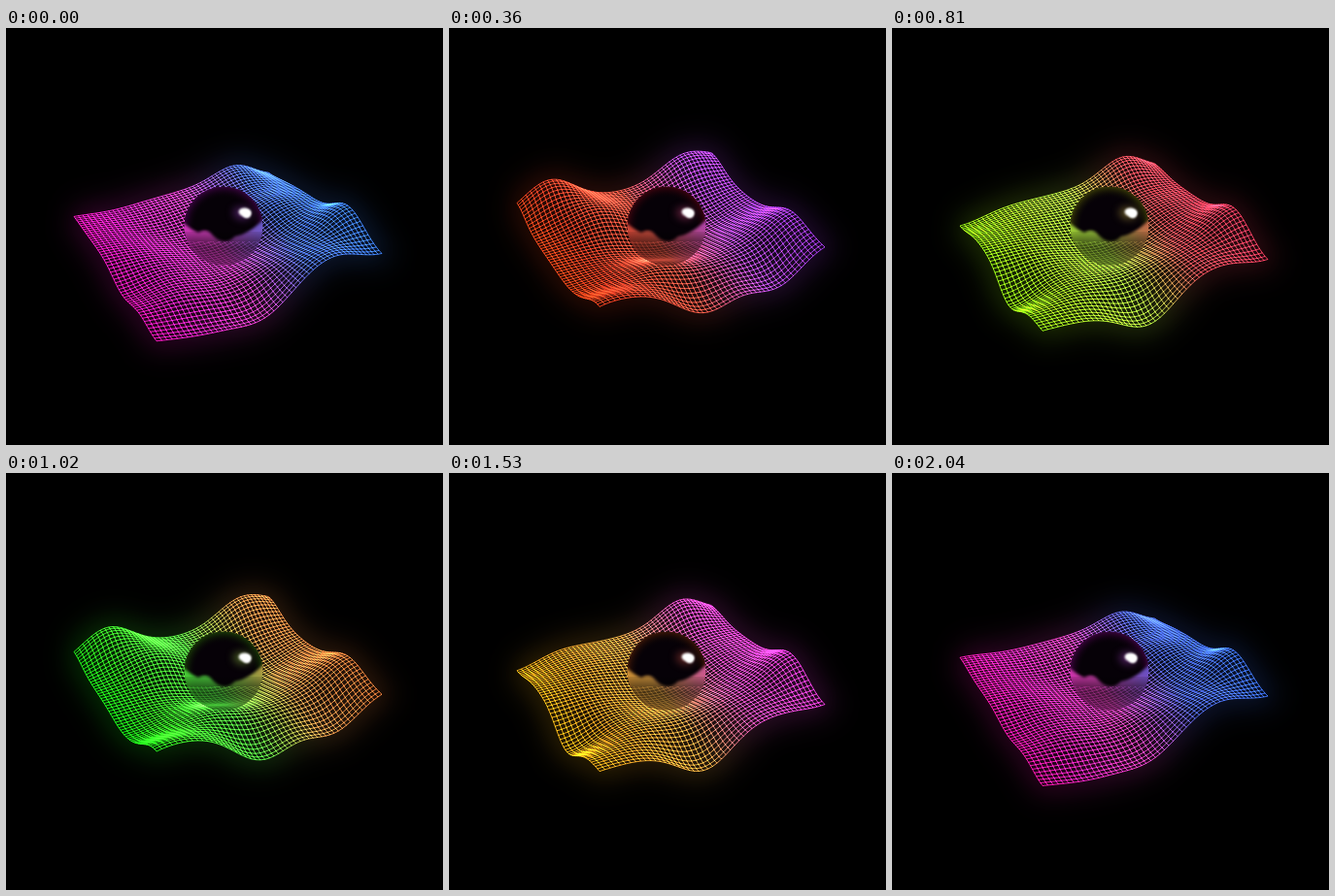
Animation of 450 by 430 pixels, one loop 2.07 s. Source, as an HTML page with a canvas:

```html
<!DOCTYPE html>
<html lang="en">
<head>
<meta charset="utf-8">
<title>Waving mesh</title>
<style>
html, body { margin: 0; width: 100%; height: 100%; overflow: hidden; background: #000; }
canvas { display: block; width: 450px; height: 430px; }
</style>
</head>
<body>
<canvas id="stage" width="450" height="430"></canvas>
<script>
const ctx = document.getElementById('stage').getContext('2d');
const LOOP = 2070, WAVE = LOOP / 3, STEP = 30, CELLS = 50, TURN = 2 * Math.PI;
const BALL = { x: 224, y: 204, r: 40.5 };

// Resting corners of the sheet, with depth for the perspective.
const LEFT = { x: 70, y: 195, depth: 1.26 }, FAR = { x: 270, y: 145, depth: 1.44 };
const NEAR = { x: 155, y: 308, depth: 1 }, RIGHT = { x: 387, y: 228, depth: 1.18 };

// A hill on the sheet that swings around its base height; it peaks at `phase` (in turns).
const hill = (u, v, base, swing, phase) => ({ u, v, base, swing, phase });
const HILLS = [
  // back edge
  hill(0, 0, 0, 12, .78),
  hill(.14, 0, 13, 17, .55),
  hill(.82, 0, 17, 6, .32),
  hill(1, 0, 1, 10, .46),
  // sides
  hill(0, .65, -9, 15, .7),
  hill(1, .75, 18, 3, 0),
  // inner ridges
  hill(.3, .25, 5, 11, .5),
  hill(.35, .75, 1, 9, .5),
  hill(.8, .4, 1, 8, 0),
  // front edge
  hill(0, 1, 4, 14, .5),
  hill(.2, 1, -3, 16, .45),
  hill(.43, 1, -26, 9, .75),
  hill(.76, 1, -6, 17, 0),
  hill(1, 1, -3, 10, .66)
];

const bell = (du, dv, width) => Math.exp(-(du * du + dv * dv) / (2 * width * width));

function sheetHeight(u, v, levels) {
  const bowl = -20 * bell(u - .5, v - .5, .19);
  return HILLS.reduce((sum, h, i) => sum + levels[i] * bell(u - h.u, v - h.v, .12), bowl);
}

function project(u, v, height) {
  const mix = [[LEFT, (1 - u) * (1 - v)], [FAR, u * (1 - v)], [NEAR, (1 - u) * v], [RIGHT, u * v]];
  let x = 0, y = 0, w = 0;
  for (const [corner, share] of mix) {
    const k = corner.depth * share;
    x += corner.x * k;
    y += corner.y * k;
    w += k;
  }
  return [x / w, y / w - height];
}

function buildMesh(time) {
  const levels = HILLS.map(h => h.base + h.swing * Math.cos(TURN * (time / WAVE - h.phase)));
  const steps = Array.from({ length: CELLS + 1 }, (_, i) => i / CELLS);
  return steps.map(u => steps.map(v => project(u, v, sheetHeight(u, v, levels))));
}

function trace(points) {
  ctx.beginPath();
  for (const [x, y] of points) ctx.lineTo(x, y);
}

function strokeMesh(mesh) {
  for (let i = 0; i <= CELLS; i++) {
    trace(mesh[i]);
    ctx.stroke();
    trace(mesh.map(line => line[i]));
    ctx.stroke();
  }
}

// Two lights: one from the front left, one from the back right.
function sheetColors(hue) {
  const g = ctx.createLinearGradient(70, 200, 274, 55);
  const stop = (at, shift, light) => g.addColorStop(at, `hsl(${(hue + shift + 720) % 360} 100% ${light}%)`);
  stop(0, 6, 55);
  stop(.15, 1, 58);
  stop(.42, 0, 65);
  stop(.68, -84, 67);
  stop(1, -92, 62);
  return g;
}

function circle(x, y, r) {
  ctx.beginPath();
  ctx.arc(x, y, r, 0, TURN);
}

function blob(x, y, rx, ry, blur, color) {
  ctx.filter = `blur(${blur}px)`;
  ctx.fillStyle = color;
  ctx.beginPath();
  ctx.ellipse(x, y, rx, ry, .15, 0, TURN);
  ctx.fill();
}

function drawBall(mesh, paint, hue) {
  const { x, y, r } = BALL;
  const cover = (fill, top = y - r) => {
    ctx.fillStyle = fill;
    ctx.fillRect(x - r, top, 2 * r, y + r - top);
  };
  ctx.save();
  circle(x, y, r);
  ctx.clip();
  cover('#060107');

  const rim = ctx.createRadialGradient(x, y, r * .7, x, y, r);
  rim.addColorStop(0, 'transparent');
  rim.addColorStop(1, `hsl(${hue - 15} 90% 28% / .4)`);
  cover(rim);

  // Reflected sheet below an uneven horizon.
  ctx.save();
  ctx.filter = 'blur(1.5px)';
  ctx.globalAlpha = .75;
  ctx.fillStyle = paint;
  ctx.beginPath();
  ctx.moveTo(x - 45, 198);
  ctx.quadraticCurveTo(192, 209, 198, 211);
  ctx.quadraticCurveTo(207, 206, 213, 214);
  ctx.quadraticCurveTo(225, 226, 236, 215);
  ctx.quadraticCurveTo(250, 213, x + 45, 194);
  ctx.lineTo(x + 45, 250);
  ctx.lineTo(x - 45, 250);
  ctx.fill();
  ctx.restore();

  const shade = ctx.createLinearGradient(0, 210, 0, 245);
  shade.addColorStop(0, 'rgb(0 0 0 / .1)');
  shade.addColorStop(.45, 'rgb(0 0 0 / .65)');
  shade.addColorStop(1, 'rgb(0 0 0 / .6)');
  cover(shade, 210);

  ctx.save();
  ctx.beginPath();
  ctx.rect(x - r, 220, 2 * r, 30);
  ctx.clip();
  ctx.strokeStyle = paint;
  ctx.lineWidth = .8;
  ctx.globalAlpha = .4;
  strokeMesh(mesh);
  ctx.restore();

  blob(243, 191, 9, 6, 4, `hsl(${hue - 30} 60% 55% / .45)`);
  blob(246, 190, 6.5, 4.5, 1.2, '#fff');
  blob(248, 192, 4, 4, .8, '#fff');
  ctx.restore();
}

function drawGlow(mesh, paint) {
  ctx.save();
  ctx.filter = 'blur(14px)';
  ctx.globalAlpha = .11;
  ctx.fillStyle = ctx.strokeStyle = paint;
  ctx.lineWidth = 26;
  ctx.lineJoin = 'round';
  trace([
    ...mesh.map(line => line[0]),
    ...mesh[CELLS],
    ...mesh.map(line => line[CELLS]).reverse(),
    ...mesh[0].slice().reverse()
  ]);
  ctx.fill();
  ctx.stroke();
  ctx.restore();
}

function draw(time) {
  const swing = 1 - Math.abs(1 - 2 * time / LOOP);
  const hue = 309 + 167 * swing;
  const mesh = buildMesh(time), paint = sheetColors(hue);

  ctx.fillStyle = '#000';
  ctx.fillRect(0, 0, 450, 430);
  drawGlow(mesh, paint);

  ctx.save();
  ctx.globalCompositeOperation = 'lighter';
  ctx.strokeStyle = paint;
  ctx.lineWidth = 1;
  ctx.globalAlpha = .8;
  strokeMesh(mesh);
  ctx.restore();

  drawBall(mesh, paint, hue);
}

const start = performance.now();
function tick() {
  const time = (performance.now() - start) % LOOP;
  draw(Math.floor(time / STEP) * STEP);
  requestAnimationFrame(tick);
}
tick();
</script>
</body>
</html>
```
